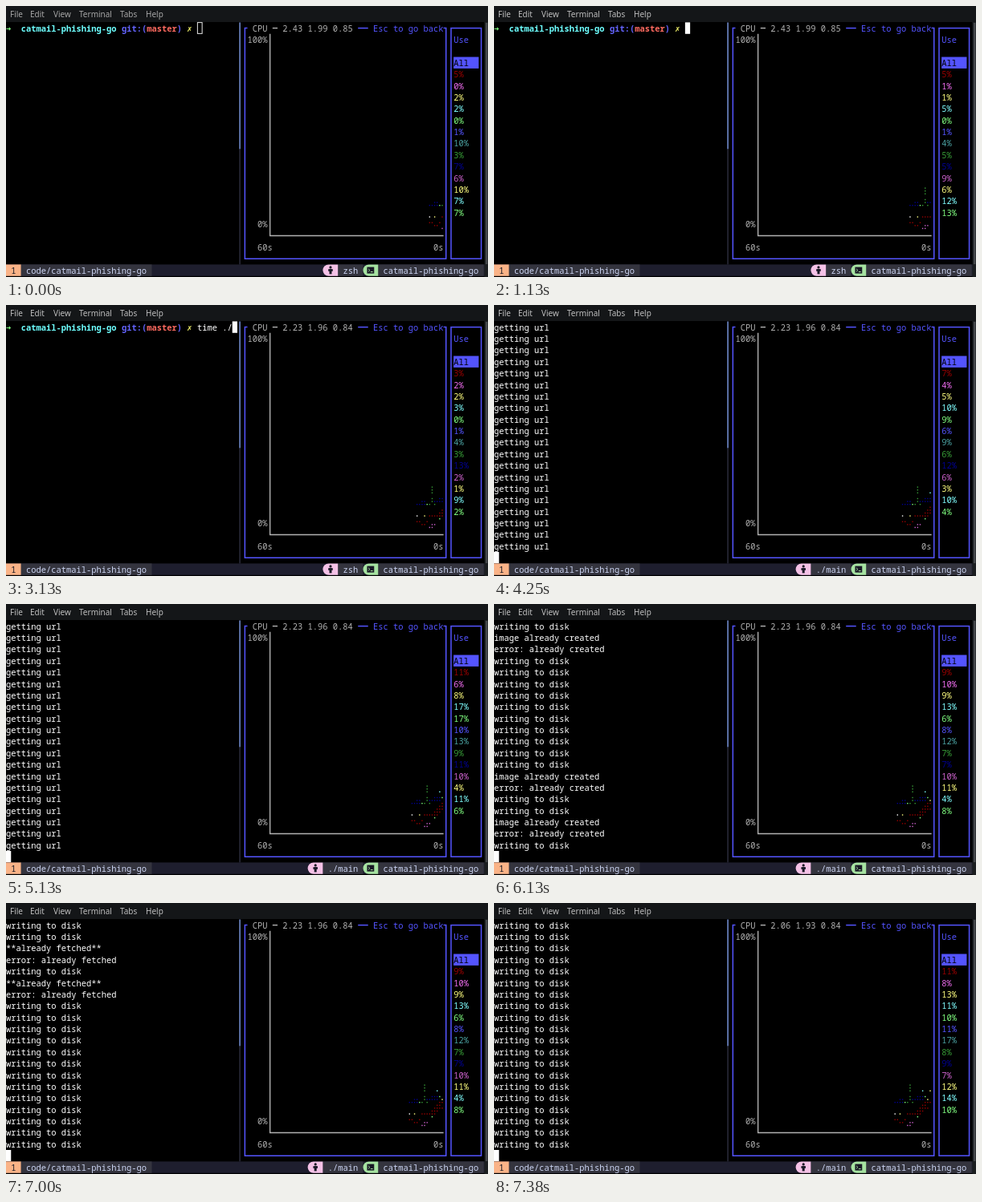
These frames come from a looping animation (600 by 338 pixels, 8 s). An HTML page with a canvas:

```html
<!DOCTYPE html>
<html lang="en">
<head>
<meta charset="utf-8">
<title>Terminal session</title>
<style>
  html, body { margin: 0; width: 100%; height: 100%; overflow: hidden; background: #000; }
  canvas { display: block; width: 600px; height: 338px; }
</style>
</head>
<body>
<canvas id="stage"></canvas>
<script>
const W = 600, H = 338, LOOP = 8000, TICK = 125;
const CW = 6.26, RH = 14.38, TOP = 20.4;
const MONO = '10.433px "Noto Sans Mono", "DejaVu Sans Mono", monospace';

const C = {
  blue: '#5454ff', grey: '#b2b2b2', white: '#ffffff',
  red: '#960000', pink: '#ee6cee', yellow: '#ffff80', cyan: '#80ffff', green: '#80ff80',
  teal: '#4aa0a0', leaf: '#369a36', navy: '#00008e', plum: '#cc62cc',
  bar: '#1e1e2e', pill: '#34343e', label: '#cdd6f4', dark: '#181825'
};

const canvas = document.getElementById('stage');
const dpr = window.devicePixelRatio || 1;
canvas.width = W * dpr;
canvas.height = H * dpr;
const ctx = canvas.getContext('2d');
ctx.scale(dpr, dpr);

const colX = c => c * CW;
const rowY = r => TOP + r * RH;

function rect(x, y, w, h, color) {
  ctx.fillStyle = color;
  ctx.fillRect(x, y, w, h);
}

function cells(col, row, n, color) {
  rect(colX(col), rowY(row), n * CW, RH, color);
}

function text(str, col, row, color, bold) {
  ctx.font = (bold ? 'bold ' : '') + MONO;
  ctx.fillStyle = color;
  ctx.fillText(str, colX(col), rowY(row) + 11.2);
}

function line(color, width, ...pts) {
  ctx.strokeStyle = color;
  ctx.lineWidth = width;
  ctx.beginPath();
  for (let i = 0; i < pts.length; i += 2) ctx.lineTo(pts[i], pts[i + 1]);
  ctx.stroke();
}

// Menu bar: brightens when the window gains focus
const menu = [['File', 5], ['Edit', 30], ['View', 59], ['Terminal', 91], ['Tabs', 142], ['Help', 174]];

function drawMenu(step) {
  rect(0, 0, W, 20, '#141618');
  const v = Math.round(166 + 24 * Math.min(1, Math.max(0, (step - 4) / 3)));
  ctx.font = '10px "Noto Sans", "Open Sans", sans-serif';
  ctx.fillStyle = `rgb(${v},${v},${v})`;
  for (const [name, x] of menu) ctx.fillText(name, x, 13.6);
}

// Left pane: prompt, then scrolling output
const phrases = {
  g: 'getting url', w: 'writing to disk', i: 'image already created',
  e: 'error: already created', f: '**already fetched**', x: 'error: already fetched'
};
const log = 'g'.repeat(20) + 'wwwfxwwwwiewwwwfxwww' + 'wiewwwwwwwwwwiewwiew' +
  'wwfxw' + 'wwwwwwwwiewwfxwfxwww' + 'w'.repeat(25);
const typing = [[11, 1], [13, 2], [15, 3], [16, 4], [18, 5], [22, 6], [25, 7], [26, 11]];
const ENTER = 27, RUN = 33, SCROLL = 41;

function cursor(col, row, focused) {
  if (focused) return cells(col, row, 1, C.white);
  ctx.strokeStyle = '#e8e8e8';
  ctx.lineWidth = 1;
  ctx.strokeRect(colX(col) + 0.5, rowY(row) + 0.2, CW - 0.5, RH - 0.6);
}

function drawPrompt(step) {
  let typed = 0;
  for (const [at, n] of typing) if (step >= at) typed = n;
  text('➜', 0, 0, C.green, true);
  text('catmail-phishing-go', 3, 0, '#6effff', true);
  text('git:(', 23, 0, '#6464ff', true);
  text('master', 28, 0, '#ff6a60', true);
  text(')', 34, 0, '#6464ff', true);
  text('✗', 36, 0, '#ffff70', true);
  text('time ./main'.slice(0, typed), 38, 0, C.white);
  if (step < ENTER) cursor(38 + typed, 0, step >= 5);
  else cursor(0, 1, true);
}

function drawOutput(step) {
  const pos = 5 * Math.min(18, Math.max(0, step - SCROLL));
  for (let r = 0; r < 20; r++) text(phrases[log[pos + r]], 0, r, C.white);
  cursor(0, 20, true);
}

// Right pane: usage readings, null entries lie between their neighbours
const readings = [
  '5 0 2 2 0 1 10 3 7 6 10 7 7', null,
  '5 1 1 5 0 1 4 5 5 9 6 12 13', null,
  '3 2 2 3 0 1 4 3 13 2 1 9 2', null,
  '11 6 8 17 17 10 13 9 11 10 4 11 6',
  '9 10 9 13 6 8 12 7 7 10 11 4 8',
  '11 8 13 11 10 11 17 8 9 7 12 14 10'
].map(s => s && s.split(' ').map(Number));
const usage = readings.map((v, i) =>
  v || readings[i - 1].map((a, k) => Math.round((a + readings[i + 1][k]) / 2)));
const rowColors = ['red', 'pink', 'yellow', 'cyan', 'green', 'blue', 'teal', 'leaf',
  'navy', 'plum', 'yellow', 'cyan', 'green'];

// Dotted runs: oldest column, newest column, dot row (columns count back from "0s")
const runs = {
  navy: [[14, 11, 63], [12, 11, 62], [7, 3, 62], [5, 3, 61]],
  red: [[14, 13, 69], [12, 11, 70], [10, 10, 69], [9, 4, 67], [5, 3, 66], [4, 1, 65], [3, 2, 64], [2, 0, 63]],
  plum: [[9, 9, 71], [8, 7, 70], [8, 8, 71]],
  leaf: [[8, 8, 57], [8, 8, 58], [8, 8, 59], [8, 8, 61], [8, 8, 62], [9, 9, 63], [7, 7, 63]],
  white: [[14, 14, 67]],
  yellow: [[11.4, 11.4, 67], [0, 0, 59], [1, 1, 62]],
  cyan: [[2.6, 2.6, 59]],
  green: [[2, 2, 61], [5, 5, 68], [10, 10, 63]]
};

function drawDots(n) {
  const shift = (8 - n) * 1.13 - 0.3;
  for (const key in runs) {
    for (const [from, to, j] of runs[key]) {
      for (let c = from; c >= to; c--) {
        const k = Math.round(c - shift);
        if (k >= 0) rect(543 - k * CW / 2 - 0.7, TOP + (j + 0.5) * RH / 4 - 0.7, 1.4, 1.4, C[key]);
      }
    }
  }
}

function drawMonitor(n) {
  const top = rowY(0.5), bottom = rowY(20.5);
  const left = colX(47.5), right = colX(87.5);
  line(C.blue, 1.5, colX(48), top, left, top, left, bottom, right, bottom, right, top, colX(87), top);
  text('CPU', 49, 0, C.grey);
  line(C.grey, 1.4, colX(53), top, colX(54), top);
  text(n < 3 ? '2.43 1.99 0.85' : n < 8 ? '2.23 1.96 0.84' : '2.06 1.93 0.84', 55, 0, C.grey);
  line(C.blue, 1.5, colX(70), top, colX(72), top);
  text('Esc to go back', 73, 0, C.blue);

  text('100%', 48, 1, C.grey);
  text('0%', 50, 17, C.grey);
  text('60s', 50, 19, C.grey);
  text('0s', 85, 19, C.grey);
  line(C.grey, 1.4, colX(52.5), rowY(1), colX(52.5), rowY(18.5), colX(87), rowY(18.5));
  drawDots(n);

  ctx.strokeStyle = C.blue;
  ctx.lineWidth = 1.5;
  ctx.strokeRect(colX(88.5), top, 6 * CW, bottom - top);
  text('Use', 89, 1, C.blue);
  cells(89, 3, 5, C.blue);
  text('All', 89, 3, '#000');
  usage[n].forEach((v, i) => text(v + '%', 89, 4 + i, C[rowColors[i]]));
}

// Status line
function pill(col, color) {
  const x = colX(col), y = rowY(21), r = RH / 2;
  ctx.fillStyle = color;
  ctx.beginPath();
  ctx.arc(x + r, y + r, r, Math.PI / 2, Math.PI * 1.5);
  ctx.lineTo(x + 3 * CW, y);
  ctx.lineTo(x + 3 * CW, y + RH);
  ctx.fill();
}

function personIcon(x, y) {
  ctx.fillStyle = C.dark;
  ctx.beginPath();
  ctx.arc(x, y - 3.6, 1.6, 0, 7);
  ctx.fill();
  rect(x - 2.8, y - 1.4, 5.6, 2.6, C.dark);
  rect(x - 1.5, y - 1.4, 3, 6.2, C.dark);
}

function shellIcon(x, y) {
  rect(x - 4.4, y - 4, 8.8, 8, C.dark);
  line('#a6e3a1', 1, x - 2.8, y - 1.8, x - 1, y, x - 2.8, y + 1.8);
  line('#a6e3a1', 1, x, y + 2, x + 2.8, y + 2);
}

function drawStatus(running) {
  const mid = rowY(21.5);
  rect(0, rowY(21), W, RH, C.bar);
  cells(0, 21, 3, '#fab387');
  text('1', 1, 21, C.dark);
  cells(3, 21, 26, C.pill);
  text('code/catmail-phishing-go', 4, 21, C.label);

  const name = running ? './main' : 'zsh';
  const col = 70 - name.length;
  cells(col - 1, 21, name.length + 2, C.pill);
  pill(col - 4, '#f5c2e7');
  personIcon(colX(col - 4) + 9.6, mid);
  text(name, col, 21, C.label);

  cells(74, 21, 21, C.pill);
  pill(71, '#a6e3a1');
  shellIcon(colX(71) + 9.4, mid);
  text('catmail-phishing-go', 75, 21, C.label);
}

function draw(t) {
  const step = Math.floor(t / TICK);
  const n = Math.min(8, Math.floor((step + 7) / 8));
  rect(0, 0, W, H, '#000');
  drawMenu(step);
  if (step < RUN) drawPrompt(step);
  else drawOutput(step);
  line('#89a8fa', 1.3, colX(46.5), TOP, colX(46.5), rowY(11));
  line('#313244', 1.3, colX(46.5), rowY(11), colX(46.5), rowY(21));
  drawMonitor(n);
  drawStatus(step >= RUN);
  rect(595.5, 20, 4.5, H - 20, '#1b1e20');
  rect(597, 21, 2.5, 301, '#46494c');
}

const start = performance.now();
function loop() {
  draw((performance.now() - start) % LOOP);
  requestAnimationFrame(loop);
}
draw(0);
requestAnimationFrame(loop);
</script>
</body>
</html>
```
